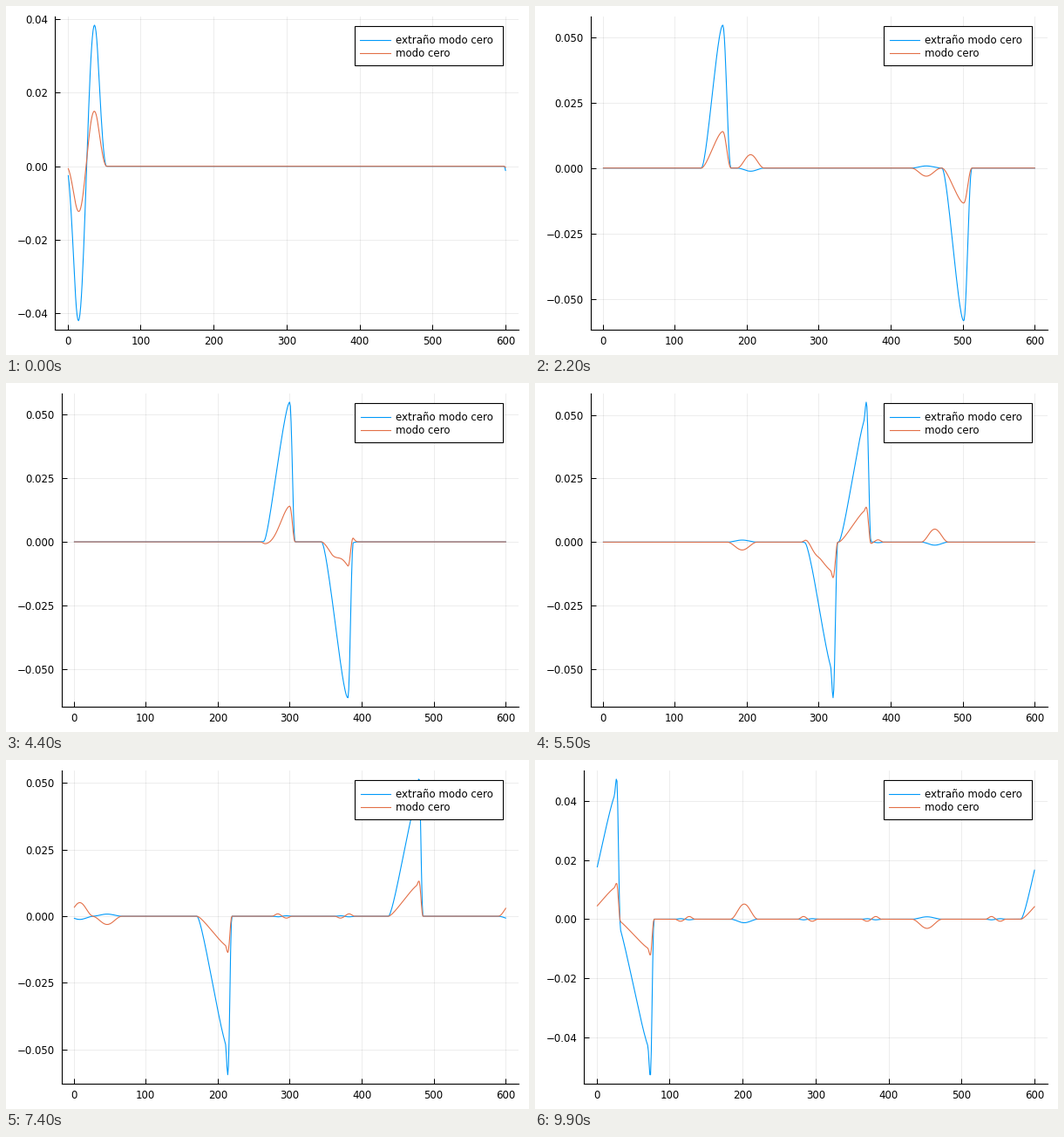
These frames come from a looping animation (600x400 px, 10000 ms). A matplotlib script:

```python
import numpy as np
import matplotlib.pyplot as plt
from matplotlib.animation import FuncAnimation
from matplotlib.patches import Rectangle

W, H, DPI = 600, 400, 100
PX = 72 / DPI
FRAMES, INTERVAL = 100, 100
PERIOD = 600
MEET = 53            # the two pulses have passed through each other
SLOW, FAST = 5.77, 7.75
BLUE, RED = "#009afa", "#e36f47"
FONT = 11.8 * PX
LINE = 1.1 * PX
TOP, BOTTOM, RIGHT = 11.8, 370.9, 588.1

plt.rcParams["font.family"] = "DejaVu Sans"
x = np.arange(1, 601)


def offset(center):
    """Signed distance from center on the periodic domain."""
    return (x - center + PERIOD / 2) % PERIOD - PERIOD / 2


def bump(d, half):
    return np.where(np.abs(d) < half, np.cos(np.pi * d / (2 * half)) ** 2, 0)


def pulse(n, foot, width, spike):
    """Bump whose crest runs ahead of its left foot, so the right side steepens."""
    rear = width + 35 * (1 - np.exp(-n / 80))
    front = 5 + 17 * np.exp(-n / 22)
    d = offset(foot + rear)
    xi = np.linspace(-1, 0, 120)
    y = np.cos(np.pi * xi / 2) ** 2
    back = np.interp(d, width * xi + (rear - width) * (y - 1), y, left=0)
    if n >= MEET:
        back = (1 - spike) * back + spike * bump(d, 3.5)
    return np.where(d < 0, back, bump(d, front))


def ripples(n):
    """Small standing pairs left on both sides of each crossing."""
    total = np.zeros(len(x))
    for start, middle, reach in ((MEET, 333, 43.5), (91, 34, 87)):
        if n >= start:
            for side in (-1, 1):
                total += .0009 * bump(offset(middle + side * (reach + 6)), 8)
                total -= .0007 * bump(offset(middle + side * (reach - 6)), 8)
    return total


def waves(n):
    late = max(0, n - 55)
    p = (.0543 + 1.3e-5 * n - 1.8e-4 * late) * pulse(n, 10 + SLOW * n, 21.5, .1)
    q = (-.0565 - 8.5e-5 * n + 4e-5 * late ** 1.5) * pulse(n, -2 - SLOW * n, 22, .17)
    r = bump(offset(35 + FAST * n), 19)
    s = bump(offset(20 - FAST * n), 21)
    rest = ripples(n)
    strange = p + q - .0012 * r + .0008 * s - .25 * rest
    plain = .2555 * p + .229 * q + .0051 * r - .0031 * s + rest
    return strange, plain


def tick_step(span):
    for e in range(-4, 0):
        for m, dec in ((1, -e), (2, -e), (2.5, 1 - e), (5, -e)):
            step = m * 10.0 ** e
            if span / step < 5.27:
                return step, dec


fig = plt.figure(figsize=(W / DPI, H / DPI), dpi=DPI, facecolor="white")
ax = fig.add_axes([.1, .1, .8, .8])
ax.set_axisbelow(True)
ax.grid(color="black", alpha=.1, lw=.7 * PX)
ax.spines[["top", "right"]].set_visible(False)
ax.spines[["left", "bottom"]].set_linewidth(LINE)
ax.tick_params(direction="in", length=6 * PX, width=PX, labelsize=FONT)
ax.tick_params(axis="x", pad=7.2 * PX)
ax.tick_params(axis="y", pad=8 * PX)
ax.set_xlim(1 - .03 * 599, 600 + .03 * 599)
ax.set_xticks(range(0, 601, 100))
blue, = ax.plot(x, 0 * x, color=BLUE, lw=LINE)
red, = ax.plot(x, 0 * x, color=RED, lw=LINE)

# Legend in pixel coordinates
top = fig.add_axes([0, 0, 1, 1])
top.set(xlim=(0, W), ylim=(H, 0))
top.axis("off")
box = top.add_patch(Rectangle((399.6, 23), 170, 45.3, fc="white", ec="black", lw=LINE))
entries = []
for y, color, name in ((39, BLUE, "extraño modo cero"), (54, RED, "modo cero")):
    line, = top.plot([406, 441], [y, y], color=color, lw=LINE)
    entries.append((line, top.text(447, y + 4.4, name, fontsize=FONT)))


def update(n):
    strange, plain = waves(n)
    blue.set_ydata(strange)
    red.set_ydata(plain)
    lo = min(strange.min(), plain.min())
    hi = max(strange.max(), plain.max())
    step, dec = tick_step(hi - lo)
    pad = .03 * (hi - lo)
    lo, hi = lo - pad, hi + pad
    ticks = np.arange(np.ceil(lo / step), np.floor(hi / step) + 1) * step + 0.0
    ax.set_ylim(lo, hi)
    ax.set_yticks(ticks, [f"{t:.{dec}f}".replace("-", "−") for t in ticks])

    # Longer tick labels push the axis to the right
    left = 56.4 + 7.2 * (dec - 2)
    ax.set_position([left / W, 1 - BOTTOM / H, (RIGHT - left) / W, (BOTTOM - TOP) / H])
    shift = .12 * (left - 56.4)
    box.set_x(399.6 + shift)
    box.set_width(170 - shift)
    for line, text in entries:
        line.set_xdata([406 + shift, 441])
        text.set_x(447 + shift / 2)
    return blue, red


anim = FuncAnimation(fig, update, frames=FRAMES, interval=INTERVAL,
                     repeat=True, repeat_delay=0, blit=False)
plt.show()
```
